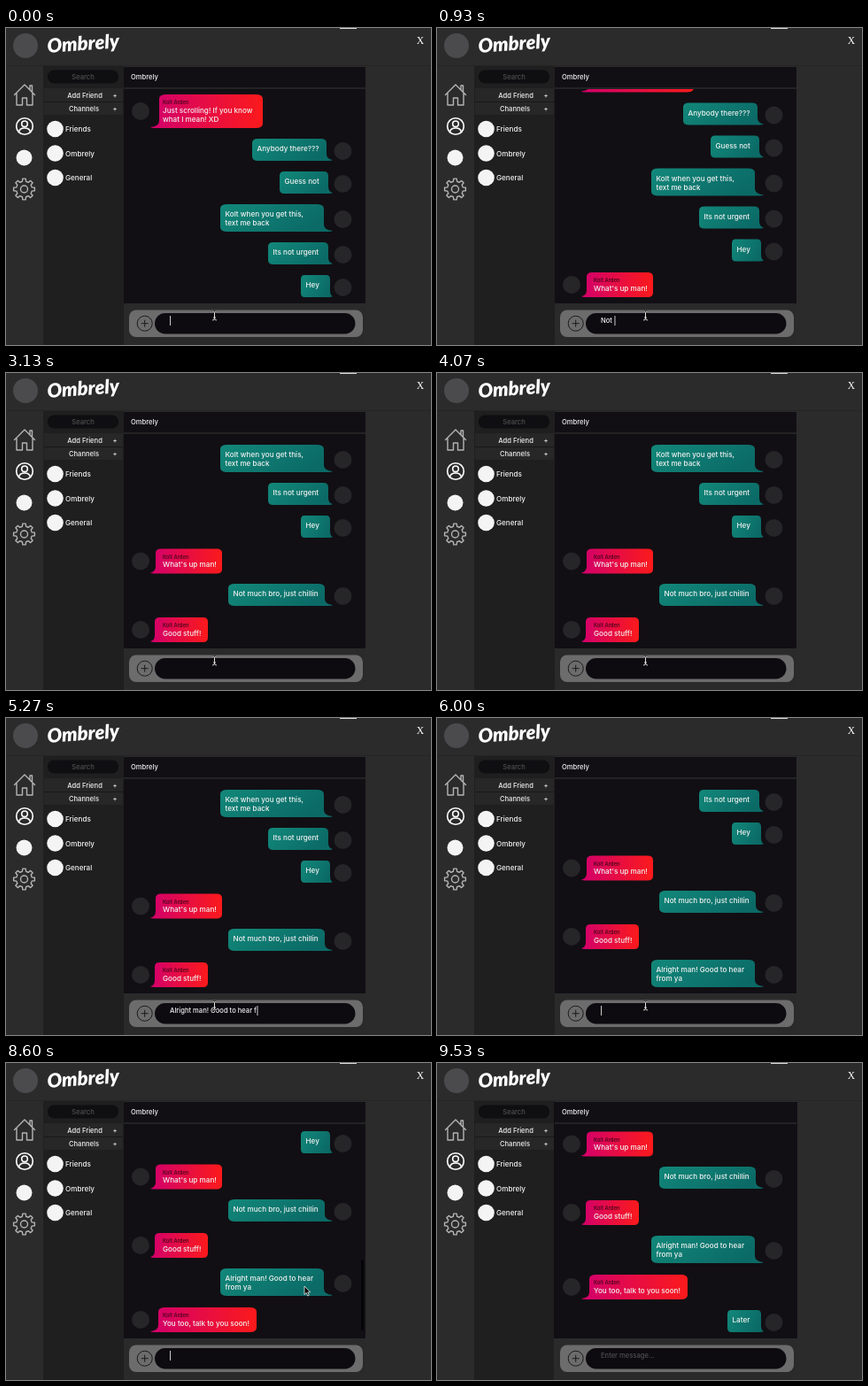
An HTML page for the animation above (9.94 s loop, 480x358 px).

```html
<!DOCTYPE html>
<html lang="en">
<head>
<meta charset="utf-8">
<title>Chat</title>
<style>
  html, body { margin: 0; width: 100%; height: 100%; overflow: hidden; background: #2b2b2b; }
  svg { display: block; width: 480px; height: 358px; }
  text { font: 500 8.15px Inter, "Open Sans", sans-serif; fill: #f2f2f2; white-space: pre; }
  .small { font-size: 7.6px; }
  .mid { text-anchor: middle; }
  .name { font-size: 5.9px; fill: #3c0416; }
  .line { fill: none; stroke: #b4b4b4; stroke-width: 1.4; stroke-linejoin: round; stroke-linecap: round; }
</style>
</head>
<body>
<svg viewBox="0 0 480 358">
  <defs>
    <linearGradient id="mine" x2="1" y2=".35"><stop stop-color="#12887a"/><stop offset="1" stop-color="#0b6a66"/></linearGradient>
    <linearGradient id="theirs"><stop stop-color="#d2006c"/><stop offset="1" stop-color="#fb1a1b"/></linearGradient>
    <clipPath id="view"><rect x="132" y="69" width="275" height="242"/></clipPath>
  </defs>

  <rect width="480" height="358" fill="#2b2b2b"/>
  <rect x="377" width="19" height="1" fill="#ddd"/>
  <path d="M0 42.500H480" stroke="#252525"/>
  <rect x="42" y="43" width="91" height="315" fill="#1f1f1f"/>

  <!-- header -->
  <circle cx="22" cy="20" r="14" fill="#4b4b4e"/>
  <text transform="translate(47 28) rotate(-4)" style="font:italic 900 22px Lato,sans-serif;fill:#fff">Ombrely</text>
  <text class="mid" x="468" y="18" style="font:11.5px 'Liberation Serif',serif;fill:#fff">X</text>

  <!-- rail -->
  <g class="line">
    <path d="M9.500 75.500 21 64l11.500 11.500M12 74v13h6.500v-8h5v8H30V74M27 69.500V65h2.500v7"/>
    <g stroke="#fff" stroke-width="1.600">
      <circle cx="21" cy="111" r="9.300"/>
      <circle cx="21" cy="108.300" r="3.300"/>
      <path d="M14.500 117.500c1-6 12-6 13 0"/>
    </g>
    <path id="gear"/>
    <circle cx="20.500" cy="182" r="4"/>
  </g>
  <circle cx="20.500" cy="146.500" r="9" fill="#f4f4f4"/>

  <!-- sidebar -->
  <rect x="47" y="47.500" width="80" height="15" rx="7" fill="#0f0e11"/>
  <text class="small mid" x="87" y="58" style="fill:#505050">Search</text>
  <rect x="43" y="68" width="89" height="30" fill="#272727"/>
  <path d="M43 83.500H132" stroke="#181818"/>
  <text class="small mid" x="89" y="79">Add Friend</text>
  <text class="small mid" x="123" y="79">+</text>
  <text class="small mid" x="88" y="94">Channels</text>
  <text class="small mid" x="123" y="94">+</text>
  <g id="rooms"></g>

  <!-- chat -->
  <rect id="foot" y="311" height="47" fill="#2a2a2a"/>
  <rect id="pane" y="44" height="267" fill="#110f14"/>
  <path d="M133 68H406" stroke="#2a2a2a" stroke-width="1.500"/>
  <text class="small" x="141" y="58">Ombrely</text>
  <g clip-path="url(#view)"><g id="list"></g></g>
  <rect id="bar" x="401" width="3" rx="1.500" fill="#050406"/>

  <!-- input -->
  <rect x="139" y="318.500" width="264" height="30.500" rx="8" fill="#6c6c6c"/>
  <rect x="168" y="322" width="226.500" height="23.500" rx="11.700" fill="#0d0b10"/>
  <circle cx="156.700" cy="333.700" r="8.500" fill="none" stroke="#1a1a1a"/>
  <path d="M152.700 333.700h8M156.700 329.700v8" stroke="#1a1a1a"/>
  <text id="hint" class="small" x="185" y="333.300" style="fill:#4f4f52">Enter message...</text>
  <text id="typed" class="small" x="185" y="333.300"></text>
  <rect id="caret" y="325" width="1" height="11" fill="#c9c9c9"/>

  <g id="beam" fill="none">
    <path id="stem" d="M-2.500-5Q0-5 0-3V3Q0 5-2.500 5M2.500-5Q0-5 0-3V3Q0 5 2.500 5M-1.500 2H1.500" stroke="#111" stroke-width="2.200"/>
    <use href="#stem" style="display:none"/>
    <path d="M-2.500-5Q0-5 0-3V3Q0 5-2.500 5M2.500-5Q0-5 0-3V3Q0 5 2.500 5M-1.500 2H1.500" stroke="#e4e4e4" stroke-width=".9"/>
  </g>
  <path id="arrow" d="M0 0V9.500L2.200 7.500 3.700 11 5.300 10.300 3.800 6.900H6.800Z" fill="#050505" stroke="#eee" stroke-width=".8"/>
</svg>
<script>
const LOOP = 9940;
const $ = id => document.getElementById(id);

// arrival time, own message, left, right, top, height, lines
const messages = [
  [0, false, 173, 290, 75, 38, "Just scrolling! If you know", "what I mean! XD"],
  [0, true, 278, 362, 125, 25, "Anybody there???"],
  [0, true, 309, 364, 162, 25, "Guess not"],
  [0, true, 242, 359, 199, 31, "Kolt when you get this,", "text me back"],
  [0, true, 296, 364, 242, 25, "Its not urgent"],
  [0, true, 333, 366, 279, 25, "Hey"],
  [130, false, 169, 244, 316.5, 28, "What's up man!"],
  [2200, true, 251, 360, 356, 25, "Not much bro, just chillin"],
  [2400, false, 168, 228, 394, 28, "Good stuff!"],
  [5730, true, 242, 359, 434, 31, "Alright man! Good to hear", "from ya"],
  [8530, false, 172, 283, 478, 28, "You too, talk to you soon!"],
  [9200, true, 328, 366, 518, 25, "Later"]
];

// first key, last key, cleared, text
const typing = [
  [780, 2000, 2070, "Not much bro, just chillin"],
  [4200, 5500, 5600, "Alright man! Good to hear from ya"],
  [8670, 9070, 9130, "Later"]
];

const caretOff = [[2900, 3400], [3900, 4200], [6230, 6730], [7230, 7730], [9330, LOOP]];

// time, x, y
const pointer = [[0, 235.5, 325], [7600, 235.5, 325], [8130, 337, 252], [9230, 337, 252], [9460, 455, -14]];

// corners widen with the bubble; the tail leaves the lower corner facing the avatar
function bubble(own, l, r, y, h) {
  const b = y + h, c = 2.5 + (r - l) * 0.05;
  const top = `M${l} ${y + 5}Q${l} ${y} ${l + c} ${y}H${r - c}Q${r} ${y} ${r} ${y + 5}`;
  return own
    ? `${top}V${b - 8}Q${r} ${b - 2} 369 ${b - 1}Q368 ${b} 364 ${b}H${l + c}Q${l} ${b} ${l} ${b - 5}Z`
    : `${top}V${b - 5}Q${r} ${b} ${r - c} ${b}H168Q164 ${b} 163 ${b - 1}Q${l} ${b - 2} ${l} ${b - 8}Z`;
}

const badge = (x, y, r, fill) => `<circle cx="${x}" cy="${y}" r="${r}" fill="${fill}"/>`;

$("list").innerHTML = messages.map(([, own, l, r, y, h, ...lines]) => {
  const x = own ? l + 5.5 : 177;
  const top = y + (own ? 14.2 : 20.6);
  const face = y + h / 2 + (own ? 1.5 : 0);
  const name = own ? "" : `<text class="name" x="177" y="${y + 11}">Kolt Arden</text>`;
  const text = lines.map((s, i) => `<text x="${x}" y="${top + i * 10}">${s}</text>`).join("");
  return `<g><path d="${bubble(own, l, r, y, h)}" fill="url(#${own ? "mine" : "theirs"})"/>${name}${text}` +
    badge(own ? 380.5 : 152, face, 10, "#262528") + "</g>";
}).join("");
const rows = [...$("list").children];

$("rooms").innerHTML = ["Friends", "Ombrely", "General"].map((s, i) => {
  const y = 114 + i * 27.5;
  return badge(55.5, y, 9.3, "#f4f4f4") + `<text x="67" y="${y + 3}">${s}</text>`;
}).join("");

// eight teeth, four corners each
$("gear").setAttribute("d", "M" + Array.from({ length: 32 }, (_, i) => {
  const a = (Math.floor(i / 4) + [-0.3, -0.18, 0.18, 0.3][i % 4]) * Math.PI / 4;
  const r = i % 4 === 1 || i % 4 === 2 ? 12 : 9;
  return `${(20.5 + r * Math.sin(a)).toFixed(2)} ${(182 - r * Math.cos(a)).toFixed(2)}`;
}).join("L") + "Z");

const show = (el, on) => el.setAttribute("visibility", on ? "visible" : "hidden");
const inside = (t, [a, b]) => t >= a && t < b;

function pointerAt(t) {
  const i = pointer.findIndex(p => p[0] > t);
  if (i < 0) return pointer.at(-1).slice(1);
  const [t0, x0, y0] = pointer[i - 1], [t1, x1, y1] = pointer[i];
  const k = (t - t0) / (t1 - t0), e = k * k * (3 - 2 * k);
  return [x0 + (x1 - x0) * e, y0 + (y1 - y0) * e];
}

function draw(t) {
  let bottom = 304;
  messages.forEach(([at, , , , y, h], i) => {
    show(rows[i], t >= at);
    if (t >= at) bottom = y + h;
  });
  $("list").setAttribute("transform", `translate(0 ${304 - bottom})`);

  const job = typing.find(([a, , c]) => t >= a && t < c);
  let text = "";
  if (job) {
    const [a, b, , s] = job;
    text = s.slice(0, 1 + Math.floor(Math.min(1, (t - a) / (b - a)) * (s.length - 1)));
  }
  const typed = $("typed");
  if (typed.textContent !== text) typed.textContent = text;
  $("caret").setAttribute("x", 185 + (text ? typed.getComputedTextLength() + 0.5 : 0));
  show($("caret"), !caretOff.some(span => inside(t, span)));
  show($("hint"), t >= 9330);

  const [x, y] = pointerAt(t);
  const overInput = y > 318;
  for (const [id, on] of [["beam", overInput], ["arrow", !overInput]]) {
    $(id).setAttribute("transform", `translate(${x} ${y})`);
    show($(id), on && t < 9460);
  }

  const barTop = t < 8530 ? 216 : 222;
  $("bar").setAttribute("y", barTop);
  $("bar").setAttribute("height", 302 - barTop);
  show($("bar"), t >= 7930 && t < 9400);

  const grow = t >= 9400 ? 1 : 0;
  for (const id of ["pane", "foot"]) {
    $(id).setAttribute("x", 133 - grow);
    $(id).setAttribute("width", 273 + 2 * grow);
  }
}

function tick() {
  draw(performance.now() % LOOP);
  requestAnimationFrame(tick);
}
tick();
</script>
</body>
</html>
```
